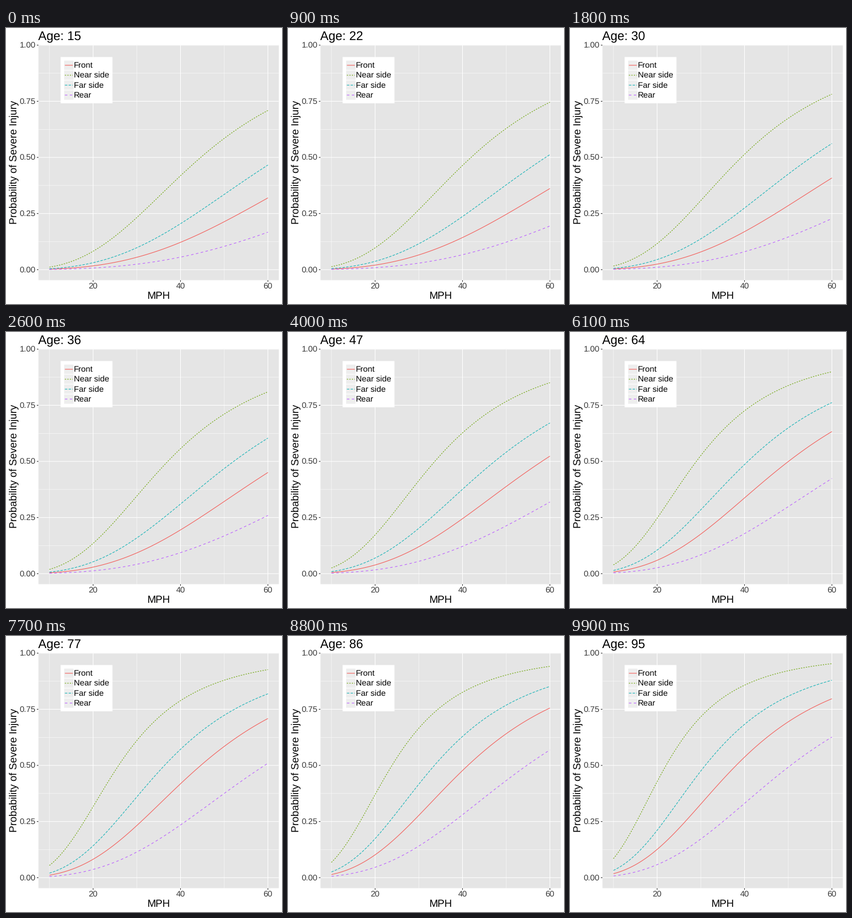
Animation, 480 px wide and 480 px high, one loop 10 s. Source, as a matplotlib script:

```python
import numpy as np
import matplotlib.pyplot as plt
from matplotlib.animation import FuncAnimation
from matplotlib.patches import Rectangle

SIZE, FRAMES, INTERVAL = 480, 100, 100
LEFT, RIGHT, TOP, BOTTOM = 56.5, 474.5, 29.5, 438.5
Y_MIN, Y_MAX = -0.0467, 1.0009
LINE = 1.07
TICK = "#1f1f1f"
TICK_TEXT = "#383838"

# label, colour, dash pattern, log-odds at 60 mph and age 15
GROUPS = [
    ("Front", "#F35E5A", "-", -0.755),
    ("Near side", "#6BA304", (0, (2, 2)), 0.891),
    ("Far side", "#17B3B7", (0, (4, 2)), -0.136),
    ("Rear", "#BB5FFF", (0, (4, 4)), -1.607),
]
LOG_SPEED, PER_YEAR = 3.01, 0.02654

# Each whole age sits on its nearest frame; the rest are tweened.
AGES = np.arange(15, 96)
KEYS = np.round((AGES - 15) / 80 * (FRAMES - 1))

plt.rcParams.update({
    "font.family": "Liberation Sans",
    "text.hinting": "no_hinting",
    "path.simplify": False,
})

fig = plt.figure(figsize=(SIZE / 72, SIZE / 72), dpi=72, facecolor="white")
ax = fig.add_axes([0, 0, 1, 1])
ax.set_xlim(0, SIZE)
ax.set_ylim(SIZE, 0)
ax.axis("off")


def px(mph):
    return 75.5 + (mph - 10) * 7.6


def py(p):
    return BOTTOM - (p - Y_MIN) / (Y_MAX - Y_MIN) * (BOTTOM - TOP)


def box(x, y, w, h, fill, edge="none", z=0):
    ax.add_patch(Rectangle((x, y), w, h, facecolor=fill, edgecolor=edge,
                           linewidth=LINE, zorder=z, snap=False))


def line(xs, ys, color, width=LINE, style="-", z=1):
    return ax.plot(xs, ys, color=color, lw=width, ls=style, zorder=z,
                   solid_capstyle="butt", dash_capstyle="butt",
                   snap=False)[0]


def label(x, y, text, size, color="black", ha="left", angle=0):
    # Agg sets glyphs one pixel below the requested baseline.
    return ax.text(x, y - 1, text, fontsize=size, color=color, ha=ha,
                   va="baseline", rotation=angle, rotation_mode="anchor",
                   zorder=8)


def draw_panel():
    box(LEFT, TOP, RIGHT - LEFT, BOTTOM - TOP, "#E5E5E5")
    for mph in (10, 30, 50):
        line([px(mph)] * 2, [TOP, BOTTOM], "white", LINE / 2)
    for p in (0.125, 0.375, 0.625, 0.875):
        line([LEFT, RIGHT], [py(p)] * 2, "white", LINE / 2)
    for mph in (20, 40, 60):
        x = px(mph)
        line([x, x], [TOP, BOTTOM], "white", z=2)
        line([x, x], [BOTTOM, BOTTOM + 2.75], TICK)
        label(x, 454, str(mph), 14.4, TICK_TEXT, "center")
    for p in (0, 0.25, 0.5, 0.75, 1):
        y = py(p)
        line([LEFT, RIGHT], [y, y], "white", z=2)
        line([LEFT - 2.75, LEFT], [y, y], TICK)
        label(51.5, y + 5.15, f"{p:.2f}", 14.4, TICK_TEXT, "right")
    label((LEFT + RIGHT) / 2, 472.2, "MPH", 18, ha="center")
    label(18.4, (TOP + BOTTOM) / 2, "Probability of Severe Injury", 18,
          ha="center", angle=90)


def draw_legend():
    key, pad = 17.28, 5.67
    x, y = 95.0, 50.5
    box(x, y, 90.2, 4 * key + 2 * pad, "white", z=5)
    for i, (name, color, style, _) in enumerate(GROUPS):
        kx, ky = x + pad, y + pad + i * key
        mid = ky + key / 2
        box(kx, ky, key, key, "#EEEEEE", "white", z=6)
        line([kx + 0.1 * key, kx + 0.9 * key], [mid, mid], color,
             style=style, z=7)
        label(kx + key, mid + 5.15, name, 14.4)


draw_panel()
draw_legend()
title = label(LEFT, 21, "", 21.6)
speed = np.linspace(10, 60, 101)
curves = [line(px(speed), speed * 0, color, style=style, z=4)
          for _, color, style, _ in GROUPS]


def update(i):
    title.set_text(f"Age: {round(15 + 80 * i / (FRAMES - 1))}")
    age = np.interp(i, KEYS, AGES)
    shift = LOG_SPEED * np.log(speed / 60) + PER_YEAR * (age - 15)
    for curve, (*_, base) in zip(curves, GROUPS):
        curve.set_ydata(py(1 / (1 + np.exp(-base - shift))))
    return [title, *curves]


anim = FuncAnimation(fig, update, frames=FRAMES, interval=INTERVAL,
                     repeat=True, repeat_delay=0)
plt.show()
```
